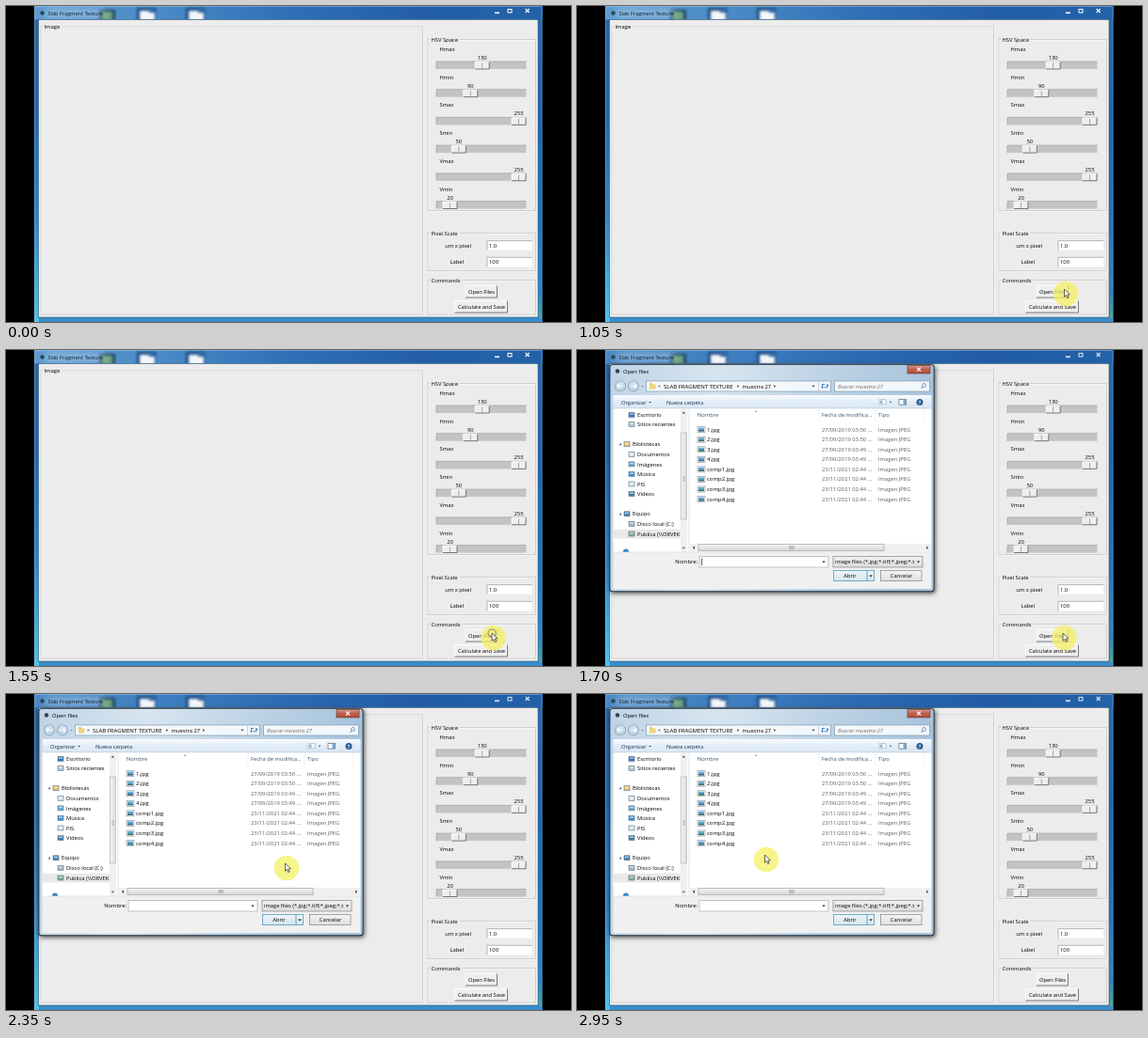
Animation, 600 px wide and 336 px high, one loop 3000 ms. Source, as an HTML page with a canvas:

```html
<!DOCTYPE html>
<html lang="es">
<head>
<meta charset="utf-8">
<title>Open files</title>
<style>
html, body { margin: 0; width: 100%; height: 100%; overflow: hidden; background: #000; }
canvas { display: block; }
</style>
</head>
<body>
<canvas id="stage" width="600" height="336"></canvas>
<script>
const c = document.getElementById('stage').getContext('2d');
const LOOP = 3000, OPEN = 1700;
const FONT = '"Open Sans", "Noto Sans", sans-serif';
const INK = '#000', DIM = '#5c5c5c';

function rect(x, y, w, h, fill) {
  c.fillStyle = fill;
  c.fillRect(x, y, w, h);
}

function frame(x, y, w, h, color, lw = 0.7) {
  c.strokeStyle = color;
  c.lineWidth = lw;
  c.strokeRect(x, y, w, h);
}

function panel(x, y, w, h, fill, edge) {
  rect(x, y, w, h, fill);
  frame(x, y, w, h, edge);
}

// y is the middle of the lowercase letters' line
function text(s, x, y, color = INK, size = 5.8, align = 'left', style = '') {
  c.font = `${style} ${size}px ${FONT}`;
  c.textAlign = align;
  c.fillStyle = color;
  c.fillText(s, x, y + 2);
}

function poly(points, fill) {
  c.beginPath();
  points.forEach(([x, y]) => c.lineTo(x, y));
  c.closePath();
  c.fillStyle = fill;
  c.fill();
}

function line(x1, y1, x2, y2, color, lw = 0.8) {
  c.beginPath();
  c.moveTo(x1, y1);
  c.lineTo(x2, y2);
  c.strokeStyle = color;
  c.lineWidth = lw;
  c.stroke();
}

function disc(x, y, r, fill) {
  c.beginPath();
  c.arc(x, y, r, 0, 7);
  c.fillStyle = fill;
  c.fill();
}

function ramp(x1, y1, x2, y2, ...stops) {
  const g = c.createLinearGradient(x1, y1, x2, y2);
  stops.forEach((s, i) => g.addColorStop(i / (stops.length - 1), s));
  return g;
}

const down = (x, y, color = '#333', r = 1.6) =>
  poly([[x - r, y - r / 2], [x + r, y - r / 2], [x, y + r * 0.7]], color);
const right = (x, y, color = '#333', r = 1.5) =>
  poly([[x - r / 2, y - r], [x + r * 0.7, y], [x - r / 2, y + r]], color);

function bevel(x, y, w, h) {
  rect(x, y, w, h, '#efefef');
  line(x, y + h, x, y, '#fff');
  line(x, y, x + w, y, '#fff');
  line(x, y + h, x + w, y + h, '#6a6a6a', 0.9);
  line(x + w, y, x + w, y + h, '#6a6a6a', 0.9);
}

function group(label, x, y, w, h, labelW) {
  frame(x + 0.6, y + 0.6, w, h, '#fff', 0.6);
  frame(x, y, w, h, '#c4c4c4', 0.7);
  rect(x + 2.5, y - 2, labelW + 2, 4, '#ececec');
  text(label, x + 3.5, y);
}

function slider(label, value, y) {
  const x = 465.3 + value * 0.3106;
  text(label, 460.5, y);
  text(value, x, y + 9, INK, 5.8, 'center');
  rect(457, y + 13, 95.5, 8, '#c3c3c3');
  line(457, y + 13, 552.5, y + 13, '#999', 0.6);
  line(457, y + 13, 457, y + 21, '#999', 0.6);
  bevel(x - 7.5, y + 13.5, 15, 7.5);
  line(x, y + 14.5, x, y + 20.5, '#888', 0.7);
}

function entry(label, right, value, y) {
  text(label, right, y, INK, 5.8, 'right');
  rect(511, y - 5, 48, 10, '#fff');
  line(511, y - 5, 559, y - 5, '#9a9a9a', 0.7);
  line(511, y - 5, 511, y + 5, '#9a9a9a', 0.7);
  text(value, 513, y);
}

// blurred wallpaper and desktop icons seen through the title bar
function glass(active) {
  c.save();
  c.beginPath();
  c.rect(30, 0, 540, 14.5);
  c.clip();
  rect(30, 0, 540, 15, active
    ? ramp(30, 0, 570, 0, '#5f9bd0', '#4a8ac6', '#2f70b6', '#245fa8', '#2262a8')
    : ramp(30, 0, 570, 0, '#4a88c4', '#3f7fc0', '#2c6ab2', '#225ca6', '#2262a8'));
  c.filter = 'blur(1.6px)';
  rect(99, 4, 17, 12, '#1f4a63');
  rect(102, 6, 11, 10, '#6fa27c');
  for (const x of [150, 202]) {
    rect(x - 11, 2, 20, 14, '#1d4a82');
    rect(x - 8, 5, 16, 11, '#f4f8fa');
    rect(x + 2, 3, 8, 4, '#2c66a8');
  }
  c.filter = 'blur(4px)';
  rect(42, 4, 62, 8, 'rgba(200,225,245,.6)');
  c.restore();
}

function mainWindow(active) {
  rect(30, 0, 539.5, 336, ramp(0, 0, 0, 336, '#2c69ac', '#1f64ac', '#2273b8', '#3a8cca'));
  rect(30, 0, 5, 336, ramp(0, 0, 0, 336, '#2c62a2', '#2068b0', '#2a86c8', '#4fc0ea'));
  glass(active);
  line(31, 0.5, 568, 0.5, 'rgba(190,220,245,.5)');
  line(30.5, 0, 30.5, 336, 'rgba(160,210,240,.55)', 0.7);
  line(569, 0, 569, 336, 'rgba(140,190,230,.5)', 0.7);
  rect(566, 300, 2.5, 32, ramp(0, 300, 0, 332, '#2a7cbd', '#54a98b'));
  disc(38.5, 7.5, 2.2, '#31444f');
  text('Slab Fragment Texture', 44.5, 7.5, '#0c1620', 5.6);

  const glyph = active ? '#fff' : '#dce8f3';
  rect(519, 6.5, 5, 1.6, glyph);
  frame(533, 3.5, 4, 3.5, glyph, 1);
  line(551.7, 3, 555.7, 7, glyph, 1.1);
  line(555.7, 3, 551.7, 7, glyph, 1.1);

  rect(34.5, 14.5, 530.5, 316.5, '#ececec');
  frame(34.5, 14.5, 530.5, 316.5, '#2d5877', 0.6);

  group('Image', 37, 22, 405.5, 306, 18);
  group('HSV Space', 448, 35.5, 114.5, 182, 29);
  [['Hmax', 130], ['Hmin', 90], ['Smax', 255], ['Smin', 50], ['Vmax', 255], ['Vmin', 20]]
    .forEach(([name, v], i) => slider(name, v, 46 + i * 29.7));

  group('Pixel Scale', 448, 241.5, 114.5, 40, 29);
  entry('um x pixel', 494, '1.0', 254.7);
  entry('Label', 486, '100', 272.3);

  group('Commands', 448, 291.5, 114.5, 36.5, 32);
  bevel(488, 297.5, 33.5, 12.5);
  text('Open Files', 505, 303.7, INK, 5.75, 'center');
  bevel(476.5, 313.5, 56, 12.5);
  text('Calculate and Save', 505, 319.8, INK, 5.75, 'center');
}

function folder(x, y) {
  rect(x - 3, y - 3, 3, 2, '#d9b34c');
  rect(x - 3, y - 2, 6.5, 5, '#f0d478');
}

function picture(x, y) {
  panel(x, y - 3, 8, 6, '#fff', '#8d9ba6');
  rect(x + 1, y - 2, 6, 2.5, '#62a7d6');
  rect(x + 1, y + 0.3, 6, 1.8, '#3f6d6e');
}

function sideItem(label, x, y, color) {
  panel(x - 9, y - 2.6, 6, 5, color, '#6b8595');
  rect(x - 8, y - 1.7, 4, 1.5, 'rgba(255,255,255,.6)');
  text(label, x, y);
}

function navPane() {
  c.save();
  c.beginPath();
  c.rect(38.5, 62.5, 79, 152.5);
  c.clip();
  rect(38.5, 190.7, 79, 9.8, '#e9e9e9');
  [['Escritorio', 64, 69, '#2f78bc'], ['Sitios recientes', 64, 79, '#b4c7d3'],
   ['Bibliotecas', 59, 100.3, '#e5c463'], ['Documentos', 64, 111, '#d6e3ea'],
   ['Imágenes', 64, 121.5, '#5ca6d0'], ['Música', 64, 132, '#3d8ed0'],
   ['PIS', 64, 142.6, '#d7e1e6'], ['Vídeos', 64, 153.2, '#427ba8'],
   ['Equipo', 59, 174.4, '#3f7fb8'], ['Disco local (C:)', 64, 185, '#a5b1b8'],
   ['Publica (\\\\ORVEK', 64, 195.6, '#79a88c']].forEach(a => sideItem(...a));
  disc(52, 214.5, 3, '#3f86ba');
  for (const y of [100.3, 174.4])
    poly([[47, y + 1], [47, y - 1.5], [44.5, y + 1]], '#555');
  c.restore();
  rect(110, 62.5, 7, 152.5, '#f0f0f0');
  panel(110.3, 88, 6, 92, ramp(110, 0, 117, 0, '#f7f7f7', '#dadada'), '#b5b5b5');
  for (let i = -1; i < 2; i++) line(112, 137 + i * 2, 115, 137 + i * 2, '#777', 0.5);
  poly([[111.6, 67.5], [115, 67.5], [113.3, 65.5]], '#444');
  down(113.3, 210.5, '#444');
  line(119, 62.5, 119, 215, '#d4dee6');
}

function fileList() {
  text('Nombre', 128, 69.3, '#3c4f68');
  text('Fecha de modifica...', 260, 69.3, '#3c4f68');
  text('Tipo', 320, 69.3, '#3c4f68');
  poly([[188.5, 66], [191.5, 66], [190, 64.3]], '#8aa2b5');
  for (const x of [257, 317, 369]) line(x, 63, x, 76, '#dfe6eb', 0.6);
  for (let i = 0; i < 8; i++) {
    const y = 84.6 + i * 10.57, n = i % 4 + 1;
    picture(128, y);
    text((i < 4 ? '' : 'comp') + n + '.jpg', 138, y, INK, 6);
    const date = i > 3 ? '23/11/2021 02:44' : '27/09/2019 03:' + (i < 2 ? 50 : 49);
    text(date + ' ...', 260, y, DIM);
    text('Imagen JPEG', 320, y, DIM);
  }
  rect(120, 206, 256, 8.5, '#f0f0f0');
  panel(129, 206.6, 197, 7, ramp(0, 206, 0, 214, '#f6f6f6', '#d6d6d6'), '#a5a5a5');
  for (let i = -1; i < 2; i++) line(228 + i * 2, 208, 228 + i * 2, 212, '#666', 0.6);
  poly([[125, 208.3], [125, 212], [122.8, 210.2]], '#444');
  right(372, 210.2, '#444', 1.8);
}

function navBar() {
  for (const x of [46, 60]) {
    disc(x, 38.5, 6, '#8ba6bb');
    disc(x, 38.5, 5.2, ramp(0, 33, 0, 44, '#d7e5f0', '#b4cbdd'));
    const d = x < 50 ? -1 : 1;
    line(x - 2.7, 38.5, x + 2.7, 38.5, '#f5fafd', 1.5);
    line(x + d * 3, 38.5, x + d, 36.3, '#f5fafd', 1.3);
    line(x + d * 3, 38.5, x + d, 40.7, '#f5fafd', 1.3);
  }
  down(69.5, 38.5, '#526b7e', 1.2);
  panel(73.5, 33, 196, 11, '#f3f8fc', '#7d98ad');
  folder(80, 38.5);
  text('«', 86, 38, '#333', 5.8);
  text('SLAB FRAGMENT TEXTURE', 92, 38.5, INK, 6);
  right(171, 38.5);
  text('muestra 27', 175.5, 38.5, INK, 5.8);
  right(210, 38.5);
  down(251, 38.5);
  line(256.5, 33, 256.5, 44, '#a9bccb', 0.6);
  // refresh: two opposed arrows
  line(260.5, 36, 260.5, 39.5, '#3973a5', 0.9);
  line(260.5, 36.5, 263, 36.5, '#3973a5', 0.9);
  line(262.5, 39.8, 266, 39.8, '#3973a5', 0.9);
  line(266, 39.8, 266, 37, '#3973a5', 0.9);
  down(260.5, 40, '#3973a5', 1.5);
  poly([[264.5, 38], [267.5, 38], [266, 36]], '#3973a5');
  panel(273.5, 33, 101, 11, '#f3f8fc', '#7d98ad');
  text('Buscar muestra 27', 277, 38.5, '#6a6a6a', 5.8, 'left', 'italic');
  c.beginPath();
  c.arc(368.5, 37.5, 1.9, 0, 7);
  c.strokeStyle = '#5b8aad';
  c.lineWidth = 0.9;
  c.stroke();
  line(367, 39, 365.3, 41, '#5b8aad', 1);
}

function toolBar() {
  rect(38.5, 48, 338, 14, ramp(0, 48, 0, 62, '#f8fbfe', '#e3edf7', '#d8e6f3'));
  line(38.5, 62, 376.5, 62, '#a9bed0', 0.6);
  text('Organizar', 47, 55.5, '#142c48');
  down(77.5, 55.7, '#1e3959', 1.3);
  text('Nueva carpeta', 95, 55.5, '#142c48');
  panel(321, 52.8, 7, 5, '#fff', '#9fb0be');
  rect(322, 53.6, 2.5, 3.3, '#8fb8d8');
  down(333, 55.5, '#405a70', 1.3);
  panel(342, 52.5, 7.5, 5.7, '#fff', '#52697b');
  rect(346.5, 53, 2.7, 5, '#6ea9d4');
  disc(364, 55.5, 3.5, '#2a5f94');
  text('?', 364, 55.5, '#fff', 5, 'center', 'bold');
}

function dialogButton(label, x, w, mid, edge, fill) {
  panel(x, 234.5, w, 11, fill, edge);
  text(label, mid, 240, INK, 5.8, 'center');
}

function dialog(t) {
  c.save();
  c.shadowColor = 'rgba(0,0,0,.7)';
  c.shadowBlur = 5;
  c.shadowOffsetX = 1;
  c.shadowOffsetY = 1.5;
  c.beginPath();
  c.roundRect(34.5, 15.2, 345, 242, 3);
  c.fillStyle = '#1f2d38';
  c.fill();
  c.restore();
  c.beginPath();
  c.roundRect(35.4, 16.1, 343.2, 240.2, 2.5);
  c.fillStyle = ramp(36, 16, 379, 60, '#bfd4e6', '#d8e5f0', '#bcd2e5', '#a6c3dc');
  c.fill();
  disc(43, 22.5, 2.2, '#31444f');
  text('Open files', 49, 22.5, '#000');
  panel(351, 16.3, 24, 8.7, ramp(0, 16, 0, 25, '#d9a092', '#c0604c', '#b34b36'), '#6b4039');
  line(361, 18.7, 365, 22.7, '#fff', 1.2);
  line(365, 18.7, 361, 22.7, '#fff', 1.2);

  navBar();
  toolBar();
  rect(38.5, 62.3, 338, 153, '#fff');
  navPane();
  fileList();

  rect(38.5, 215, 338, 39, '#f0f0f0');
  line(38.5, 215, 376.5, 215, '#d3dce3', 0.6);
  text('Nombre:', 128, 225.3, INK, 5.8, 'right');
  panel(130, 219.5, 137, 11.5, '#fff', '#a3b0ba');
  down(262, 225.3, '#222');
  if ((t - 1345) % 1060 < 530) line(132.6, 221.5, 132.6, 229, '#111', 0.7);
  panel(272, 219.5, 95, 11.5, ramp(0, 219, 0, 231, '#f3f3f3', '#dcdcdc'), '#858585');
  text('image files (*.jpg;*.tiff;*.jpeg;*.t', 274, 225.3, INK, 5.75);
  down(362.5, 225.3, '#222');
  dialogButton('Abrir', 272.5, 43, 290, '#3f8db4', ramp(0, 234, 0, 246, '#f0f6f9', '#d3e4ec'));
  line(308, 234.5, 308, 245.5, '#3f8db4', 0.8);
  down(312, 240.3, '#111');
  dialogButton('Cancelar', 322.5, 43.5, 344.5, '#858585', ramp(0, 234, 0, 246, '#f5f5f5', '#dedede'));
}

// time, x, y of the pointer highlight
const PATH = [[600, 534, 352], [950, 519, 306], [1200, 519, 306], [1450, 517.5, 306],
  [1900, 517.5, 306], [2350, 298, 185], [2500, 286, 183], [2900, 201, 176], [3000, 201, 176]];

function pointer(t) {
  if (t < PATH[0][0]) return;
  const i = PATH.findIndex(p => p[0] > t);
  const [t0, x0, y0] = PATH[i - 1], [t1, x1, y1] = PATH[i];
  const u = (t - t0) / (t1 - t0), k = u * u * (3 - 2 * u);
  const x = x0 + (x1 - x0) * k, y = y0 + (y1 - y0) * k;
  c.save();
  c.beginPath();
  c.rect(30, 0, 539.5, 336);
  c.clip();
  disc(x, y, 13.3, 'rgba(246,240,96,.72)');
  c.translate(x - 1.5, y - 5);
  if (t >= 1480 && t < 1650) {
    c.beginPath();
    c.arc(0, 0, 3 + (t - 1480) / 70, 0, 7);
    c.strokeStyle = '#777b70';
    c.lineWidth = 0.9;
    c.stroke();
  }
  poly([[0, 0], [0, 8.2], [1.9, 6.5], [3.2, 9.5], [4.6, 8.9], [3.3, 6], [5.8, 5.8]], '#fff');
  c.strokeStyle = '#222';
  c.lineWidth = 0.7;
  c.stroke();
  c.restore();
}

function draw(now) {
  const t = now % LOOP, open = t >= OPEN;
  rect(0, 0, 600, 336, '#000');
  mainWindow(!open);
  if (open) dialog(t);
  pointer(t);
}

const start = performance.now();
function tick() {
  draw(performance.now() - start);
  requestAnimationFrame(tick);
}
tick();
</script>
</body>
</html>
```
